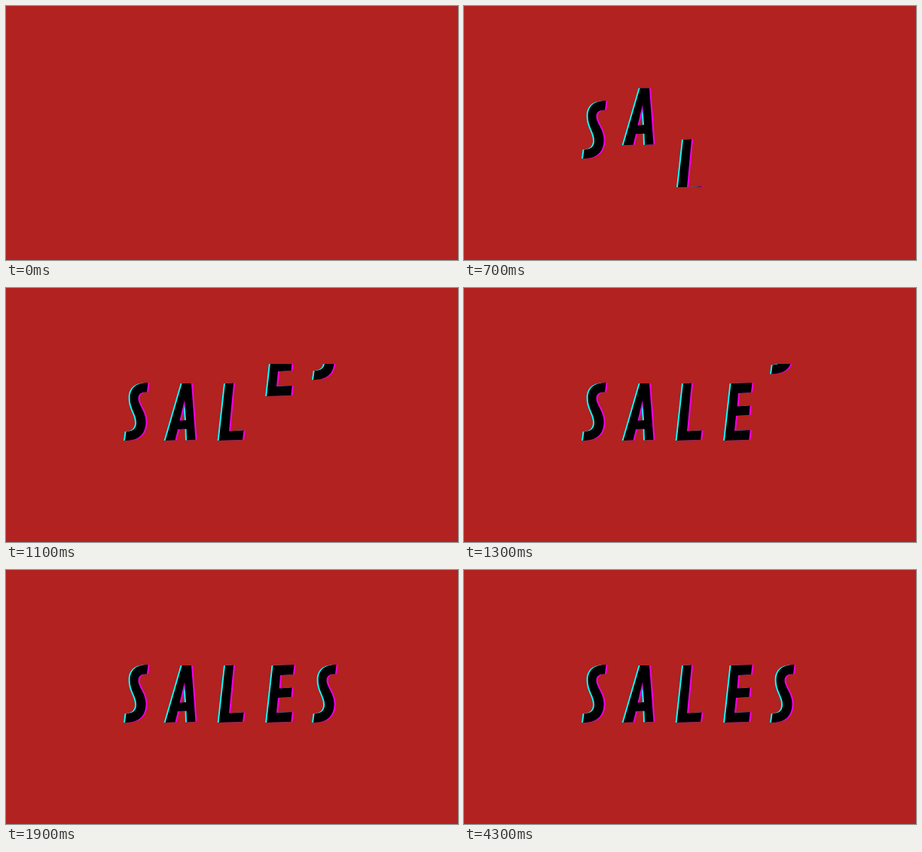
Recreate the animation shown at these times as an HTML page. Size 600x338 px, loop 5 s.

```html
<!DOCTYPE html>
<html lang="en">
<head>
<meta charset="utf-8">
<title>Sales</title>
<style>
  html, body { margin: 0; width: 100%; height: 100%; overflow: hidden; background: #b12220; }
  svg { display: block; width: 100vw; height: 100vh; }
</style>
</head>
<body>
<svg viewBox="0 0 600 338" role="img" aria-label="SALES">
  <defs>
    <clipPath id="slot"><rect y="101" width="600" height="140"/></clipPath>
  </defs>
  <rect width="600" height="338" fill="#b12220"/>
  <g id="word" clip-path="url(#slot)"></g>
</svg>
<script>
const LOOP = 5000;
const STEP = 100;           // the picture advances ten times a second
const FIRST_STOP = 544;     // when the first letter comes to rest
const STAGGER = 230.5;
const BRAKE = 0.003215;     // px per ms², constant deceleration
const ROLL = 349.8;         // distance between the two passes of a letter

const glyphs = {
  S: 'M188.5 126L187 138.5C179.5 138 175.5 141 175.5 147C175.5 156 186.5 165 185.5 180C184.5 196 175 203 158 203L159.6 191C168.6 191 173.1 187 173.1 179C173.1 168 164.1 160 164.6 146C165 132 174 126 188.5 126Z',
  A: 'M233.6 127L246 127L251.5 202L240 202.5L239.5 187.5L228 188L224.5 202.5L211.6 203ZM237 149L230.5 176.5L239 176Z',
  L: 'M291 127L302 126.5L296 190.5L315.5 189.5L314 202L282.6 203Z',
  E: 'M354.5 127L382.5 126L381 139L364 140L362.6 157.5L379.5 156.5L378.5 169L361 170L359 190L379.7 189L378.3 202L346.1 203Z'
};
const layers = [['#00ffff', -2], ['#f000e0', 2.2], ['#000', 0]];

const word = document.getElementById('word');

function add(parent, tag, attributes) {
  const node = document.createElementNS('http://www.w3.org/2000/svg', tag);
  for (const name in attributes) node.setAttribute(name, attributes[name]);
  return parent.appendChild(node);
}

const letters = [...'SALES'].map((char, i) => {
  const group = add(word, 'g', {});
  const shift = i === 4 ? 250 : 0;
  for (const [fill, dx] of layers) {
    add(group, 'path', {
      d: glyphs[char], fill, 'fill-rule': 'evenodd',
      transform: `translate(${shift + dx} 0)`
    });
  }
  return group;
});

// Each letter rolls through the slot once, then brakes to rest on its second pass.
function offsetAt(time, index) {
  const left = Math.max(0, FIRST_STOP + index * STAGGER - time);
  const distance = BRAKE * left * left;
  return distance > 175 ? ROLL - distance : -distance;
}

function draw(now) {
  const time = Math.floor((now % LOOP) / STEP) * STEP;
  letters.forEach((letter, i) =>
    letter.setAttribute('transform', `translate(0 ${offsetAt(time, i).toFixed(2)})`));
}

function tick() {
  draw(performance.now());
  requestAnimationFrame(tick);
}
tick();
</script>
</body>
</html>
```
